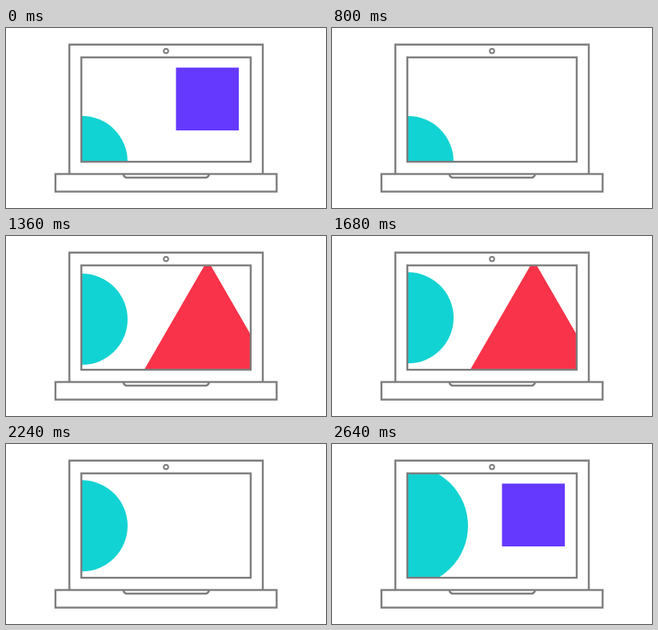
These frames come from a looping animation (400x225 px, 7960 ms). An HTML page:

```html
<!DOCTYPE html>
<html lang="en">
<head>
<meta charset="utf-8">
<title>Laptop shapes</title>
<style>
html, body { margin: 0; width: 100%; height: 100%; overflow: hidden; background: #fff; }
svg { display: block; width: 100%; height: 100%; }
</style>
</head>
<body>
<svg viewBox="0 0 400 225">
  <defs>
    <clipPath id="screen"><rect x="95" y="37" width="210.5" height="130"/></clipPath>
  </defs>
  <rect width="400" height="225" fill="#fff"/>
  <g clip-path="url(#screen)">
    <circle id="disc" cx="95" cy="167" r="57" fill="#12d3d3"/>
    <rect id="square" x="212.5" y="49.5" width="78.5" height="78.5" fill="#6639ff"/>
    <path id="triangle" d="M0 0L104 180H-104Z" fill="#f93349"/>
  </g>
  <g fill="none" stroke="#7d7d7d" stroke-width="2.4">
    <path d="M79.2 182.5V20.8H321V182.5"/>
    <rect x="61.8" y="182.5" width="276.5" height="22"/>
    <rect x="94.2" y="36.7" width="211.7" height="130.5"/>
    <path d="M146.5 183Q148 187 151 187H249.5Q252.500 187 254 183"/>
    <circle cx="200" cy="28.7" r="2.8" stroke-width="2"/>
  </g>
</svg>
<script>
const LOOP = 7960, STEP = 40;
const [disc, square, triangle] = ['disc', 'square', 'triangle'].map(id => document.getElementById(id));

const span = (t, from, to) => Math.min(1, Math.max(0, (t - from) / (to - from)));
const mix = (a, b, p) => a + (b - a) * p;
const easeOut = (u, power) => 1 - (1 - u) ** power;
const backIn = u => 2.35 * u ** 3 - 1.35 * u ** 2;

function draw(t) {
  // The square leaves to the right and later returns.
  const shift = t < 2240
    ? 93 * span(t, 0, 800) ** 1.7
    : mix(93, 0, easeOut(span(t, 2240, 2640), 3));
  square.setAttribute('x', 212.5 + shift);

  // The disc rises, then grows.
  disc.setAttribute('cy', mix(167, 102.3, easeOut(span(t, 800, 1600), 3)));
  disc.setAttribute('r', mix(57, 75, easeOut(span(t, 2240, 2640), 3)));

  // The triangle rises, lifts a little and drops out.
  const apex = t < 1840
    ? mix(168, 30, easeOut(span(t, 800, 1360), 5))
    : mix(30, 168, backIn(span(t, 1840, 2240)));
  triangle.setAttribute('transform', `translate(252 ${apex})`);
}

const start = performance.now();
function tick() {
  const t = (performance.now() - start) % LOOP;
  draw(Math.floor(t / STEP) * STEP);
  requestAnimationFrame(tick);
}
draw(0);
requestAnimationFrame(tick);
</script>
</body>
</html>
```
